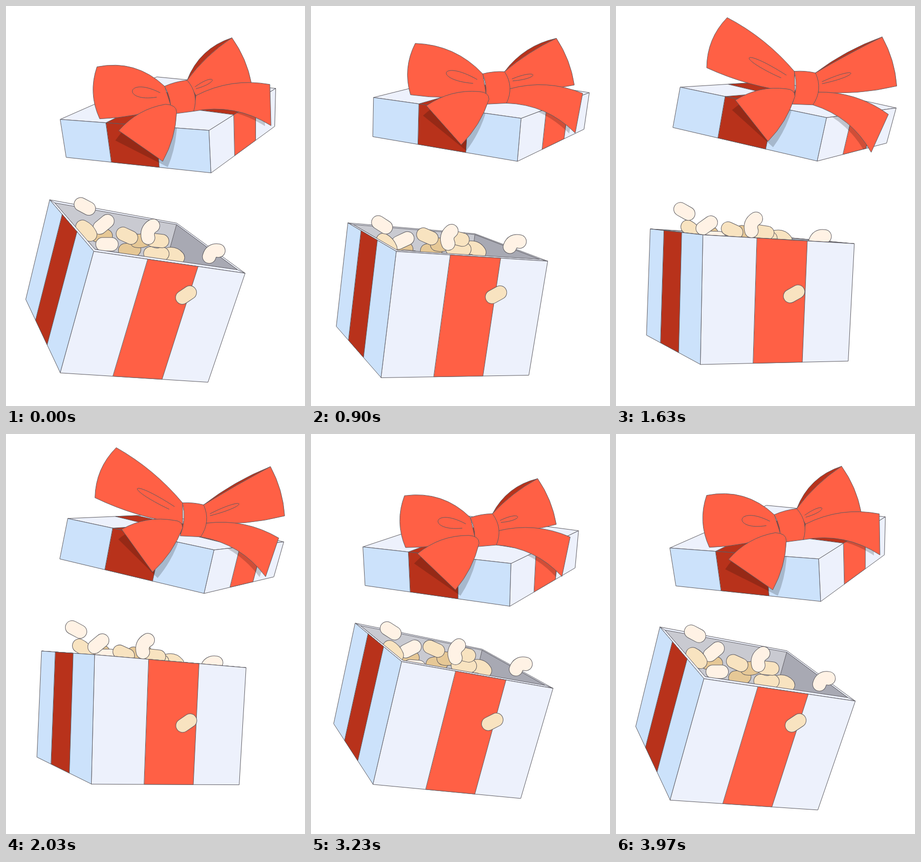
An HTML page that plays this animation: 597 by 800 pixels, repeating every 4010 ms.

```html
<!DOCTYPE html>
<html lang="en">
<head>
<meta charset="utf-8">
<title>Gift box</title>
<style>
  html, body { margin: 0; width: 100%; height: 100%; overflow: hidden; background: #fff; }
  svg { display: block; width: 100%; height: 100%; }
</style>
</head>
<body>
<svg id="stage" viewBox="0 0 597 800" stroke-linejoin="round" stroke-linecap="round"></svg>
<script>
const LOOP = 4010;
const RED = '#ff6045', DARK = '#b8321b', BLUE = '#cce2fb', PALE = '#edf1fc';
const CREAM = '#fff2e5', TAN = '#f8e3c0', BROWN = '#e6c896', LINE = '#5c5a60';

// Vectors
const add = (a, b, k = 1) => [a[0] + b[0] * k, a[1] + b[1] * k];
const sub = (a, b) => add(a, b, -1);
const mix = (a, b, k) => add(a, sub(b, a), k);
const normal = (a, b) => [b[1] - a[1], a[0] - b[0]];

// Path pieces; a positive bulge lies to the left of the direction of travel.
const xy = p => p.map(v => v.toFixed(2)).join(' ');
const move = p => 'M' + xy(p);
const line = p => 'L' + xy(p);
const arc = (a, b, bulge) => `Q${xy(add(mix(a, b, .5), normal(a, b), 2 * bulge))} ${xy(b)}`;
const outline = points => 'M' + points.map(xy).join('L') + 'Z';

const shape = (d, fill, extra = `stroke="${LINE}"`) => `<path d="${d}" fill="${fill}" ${extra}/>`;
const poly = (fill, ...points) => shape(outline(points), fill);
const band = (fill, a, b, c, d, from, to, from2 = from, to2 = to) =>
  poly(fill, mix(a, b, from), mix(a, b, to), mix(c, d, to2), mix(c, d, from2));
const clip = (id, ...points) => `<clipPath id="${id}"><path d="${outline(points)}"/></clipPath>`;
const shadow = (d, id) => shape(d, '#000', `opacity=".19" clip-path="url(#${id})"`);

// Everything that moves is a sum of waves over the loop.
function motionAt(angle) {
  const { sin, cos } = Math;
  const wave = (mean, c, s, c2 = 0, s2 = 0) =>
    mean + c * cos(angle) + s * sin(angle) + c2 * cos(2 * angle) + s2 * sin(2 * angle);
  return {
    wave,
    tilt: wave(.5, -.5, .06),
    lean: wave(.5, -.5, .18),
    flap: wave(.38, -.47, .1, .1, -.04),
    leftSway: wave(.61, -.48, 0, -.12, .12),
    rightSway: wave(.55, -.52, .05, -.11, -.28),
    bounce: sin(angle) ** 2,
    squash: 1 - .15 * Math.max(0, cos(angle - 4.19)) ** 4,
    facingFront: cos(angle) < 0
  };
}

// Bean places follow the box edges: across, depth and down, plus a bounce in pixels.
const bean = (fill, across, depth, down, bounce, angle, spin, half = 9, bend = 0) =>
  ({ fill, across, depth, down, bounce, angle, spin, half, bend });
const PILE = [
  bean(BROWN, .13, .3, -.027, 14, 5, 15),
  bean(CREAM, .145, .2, 0, 20, 0, 5),
  bean(BROWN, .28, .15, 0, 0, -5, -5),
  bean(BROWN, .39, .28, -.045, 5, -14, 4, 11, 5),
  bean(CREAM, .89, .35, -.002, -14, -33, 5, 11, -10),
  bean(TAN, .575, .17, 0, -6, 18, 10, 10, -6),
  bean(TAN, .465, .17, .012, -6, 2, 0, 12, 5),
  bean(TAN, .52, .36, -.03, -8, 6, 8),
  bean(TAN, .32, .37, -.03, -8, 25, -1)
];
const CREAM_EDGE = bean(CREAM, .155, .38, -.09, 20, -40, 15, 10);
const TAN_EDGE = bean(TAN, .043, .34, -.037, 13, 45, 4, 11, -4);
const LOOSE = [
  bean(CREAM, .03, .45, -.185, 19, 28, 5),
  bean(CREAM, .44, .33, -.105, 8, 112, -8, 13, 10)
];

function drawBean(fill, [x, y], angle, half = 9, bend = 0) {
  const d = `M${-half} ${-bend / 4}Q0 ${bend * .75} ${half} ${-bend / 4}`;
  const stroke = (color, width) => shape(d, 'none', `stroke="${color}" stroke-width="${width}"`);
  return `<g transform="translate(${x.toFixed(2)} ${y.toFixed(2)}) rotate(${angle.toFixed(2)})">` +
    stroke(LINE, 28) + stroke(fill, 26) + '</g>';
}

function drawBox({ wave, tilt, lean, bounce, facingFront }) {
  const across = [302, wave(34.5, 9.2, -16.7)];
  const depth = mix([-88, -103], [-106, -7], tilt);
  const down = mix([-67, 243], [-6, 259], lean);
  // Far edges are shorter and converge a little.
  const b = [wave(176.3, -.8, -5.6), wave(466.5, 24.3, 20.8)];
  const a = add(b, depth), c = add(b, across), f = add(b, down);
  const d = add(add(a, across, .84), [0, 10 - 10 * tilt]);
  const e = add(add(a, down, .82), [7 - 11 * tilt, 0]);
  const g = add(add(f, across, .976), [0, -24]);

  const inset = (u, v) => mix(mix(a, d, u), mix(b, c, u), v);
  const ia = inset(.022, .05), ib = inset(.022, .95), ic = inset(.977, .94), id = inset(.977, .04);
  const place = item => drawBean(
    item.fill,
    add(add(add(add(b, across, item.across), depth, item.depth), down, item.down), [0, item.bounce * bounce]),
    item.angle + item.spin * bounce, item.half, item.bend);
  const edge = facingFront ? [TAN_EDGE, CREAM_EDGE] : [CREAM_EDGE, TAN_EDGE];
  const slide = -.025 * tilt;

  return poly(PALE, a, b, c, d) + poly('#c9cad1', ia, ib, ic, id) +
    poly('#a8a9b3', id, ic, add(id, down, .41)) +
    [...PILE, ...edge].map(place).join('') +
    poly(PALE, a, b, c, ic, ib, ia) +
    poly(BLUE, a, b, f, e) + band(DARK, a, b, e, f, .283 + slide, .617 + slide) +
    poly(PALE, b, c, g, f) + band(RED, b, c, f, g, .357, .689) +
    LOOSE.map(place).join('') +
    drawBean(TAN, [wave(363.5, 0, 0, -4, 7), wave(577.4, 0, 0, .6, 2)], wave(-31, 0, 0, -3, -3));
}

// Slim teardrop crease from a round to b, reaching out to the far point.
function drawCrease(a, far, b, width) {
  const root = mix(a, b, .5), mid = mix(root, far, 4 / 3);
  const side = normal(root, far), k = width / Math.hypot(...side);
  return shape(`${move(a)}C${xy(add(mid, side, k))} ${xy(add(mid, side, -k))} ${xy(b)}`, 'none');
}

const leftTailPath = (corner, top, side, tip) =>
  `${move(corner)}${arc(corner, top, .09)}Q${xy([side[0], top[1] + 1])} ${xy(side)}${arc(side, tip, .06)}Z`;
const rightTailPath = (start, corner, tip, end) =>
  `${move(start)}${arc(start, corner, .085)}${line(tip)}${arc(tip, end, -.1)}Z`;

function drawLid({ wave, tilt, flap, leftSway, rightSway, bounce, squash }) {
  const tilted = (origin, rest, open) => add(origin, mix(rest, open, tilt));

  const l = [wave(116.3, -7.8, 10.3), wave(197.5, 29.3, -19.4)];
  const m = tilted(l, [297, 22], [292, 63]);
  const r = tilted(m, [133, -84], [139, -16]);
  const k = tilted(l, [193, -85], [191, -8]);
  const l2 = tilted(l, [12, 76], [-16, 81]);
  const m2 = tilted(m, [4, 85], [-20, 87]);
  const r2 = tilted(r, [-2, 76], [-20, 70]);

  const knot = [wave(334.8, -18.2, 11.1), wave(148.8, 11.7, -15.2)];
  const knotRight = tilted(knot, [45, -12], [42, 4]);
  const knotLow = tilted(knot, [12, 56], [-5, 66]);
  const knotLowRight = tilted(knot, [58, 50], [36, 68]);

  const flapped = (origin, rest, open, dip = 0) => {
    const [x, y] = mix(rest, open, flap);
    return add(origin, [x * squash, y + dip * bounce]);
  };
  const leftTop = flapped(knot, [-135, -38], [-134, -115]);
  const leftLow = flapped(knot, [-129, 66], [-180, -15]);
  const leftEnd = tilted(knot, [12, 38], [0, 42]);
  const peak = flapped(knotRight, [89, -85], [138, -76], 16);
  const rightLow = flapped(knotRight, [128, 6], [166, 23], 16);

  const leftTail = [
    add(knot, mix([-91, 89], [-122, 52], leftSway)),
    tilted(knot, [2, 36], [-17, 35]),
    tilted(knot, [24, 52], [0, 50]),
    add(knot, mix([-3, 150], [-61, 138], leftSway))
  ];
  const swayed = (rest, open) => add(knotRight, mix(rest, open, rightSway));
  const rightTail = [
    swayed([17, 31], [5, 37]), swayed([164, 13], [149, 70]), swayed([164, 95], [121, 147]), knotLowRight
  ];
  const [corner, top, side, tip] = leftTail, start = rightTail[0];
  const leftCast = leftTailPath(add(corner, [-7, 20]), top, side, add(tip, [10, 12]));
  const rightCast = rightTailPath(...rightTail.map(p => add(p, [-12, 1])));

  const box = clip('front', l, m, m2, l2) + clip('side', m, r, r2, m2) +
    poly(PALE, l, m, r, k) +
    band(DARK, l, k, m, r, .5, .72, .375, .7) + band(DARK, l, m, k, r, .307, .6, .3, .5) +
    poly(BLUE, l, m, m2, l2) + band(DARK, l, m, l2, m2, .307, .642, .312, .642) +
    poly(PALE, m, r, r2, m2) + band(RED, m, r, m2, r2, .372, .7) +
    shadow(leftCast, 'front') + shadow(rightCast, 'side');

  const rim = .12 - .09 * flap, fold = .045 - .04 * flap;
  const loops =
    shape(`${move(knotRight)}${arc(knotRight, peak, rim)}${arc(peak, knotRight, -fold)}Z`, DARK) +
    shape(`${move(knotRight)}${arc(knotRight, peak, fold)}${arc(peak, rightLow, .055)}` +
      `${arc(rightLow, start, .04)}Z`, RED) +
    shape(`${move(knot)}${arc(knot, leftTop, .09 * flap - .13)}${arc(leftTop, leftLow, -.1)}` +
      `${arc(leftLow, leftEnd, -.04)}Z`, RED);

  const front = shape(rightTailPath(...rightTail), RED) +
    shape(`${move(knot)}${arc(knot, knotLow, .08)}${line(knotLowRight)}` +
      `${arc(knotLowRight, knotRight, -.14)}${arc(knotRight, knot, -.04)}Z`, RED) +
    shape(leftTailPath(...leftTail), RED);

  const creases =
    drawCrease(flapped(knot, [-9, 13], [-17, 7]), flapped(knot, [-64, 9], [-93, -31]),
      flapped(knot, [-16, 22], [-28, 12]), 17 * flap - 28) +
    drawCrease(flapped(knotRight, [16, 13], [13, 18]), flapped(knotRight, [50, -1], [73, -2], 8),
      flapped(knotRight, [18, 17], [13, 22]), 11);

  return box + loops + front + creases;
}

const stage = document.getElementById('stage');
const began = performance.now();

function tick() {
  const progress = (performance.now() - began) % LOOP / LOOP;
  const motion = motionAt(progress * 2 * Math.PI);
  stage.innerHTML = drawBox(motion) + drawLid(motion);
  requestAnimationFrame(tick);
}
tick();
</script>
</body>
</html>
```
